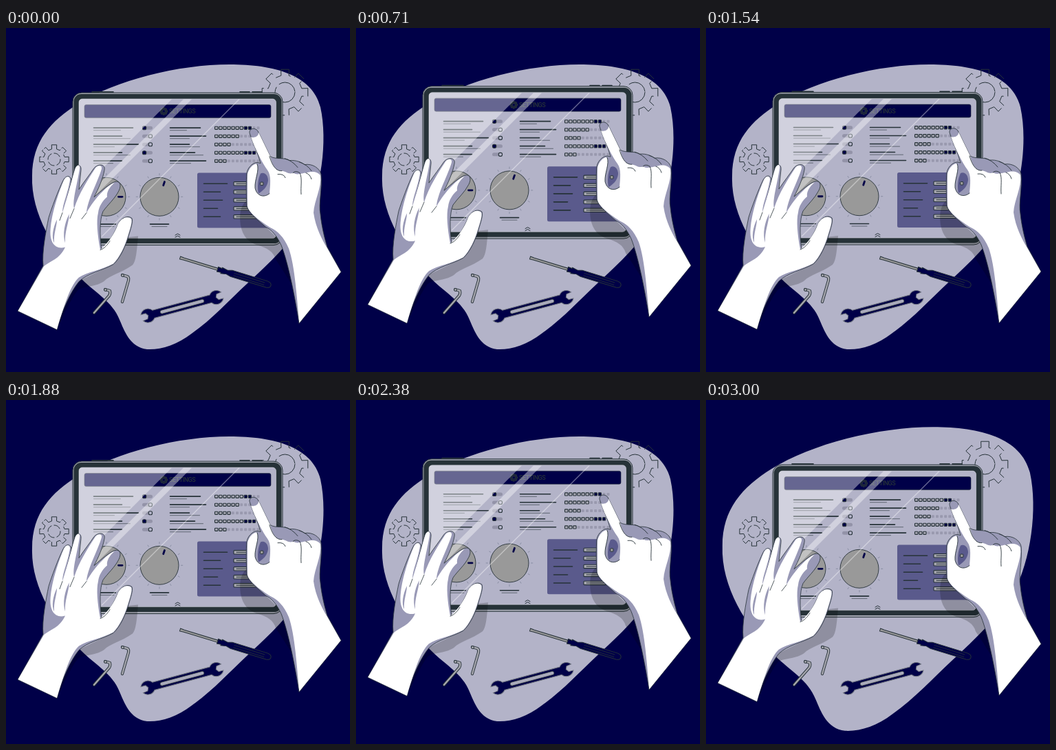
An HTML page for the animation above (3040 ms loop, 500x500 px).

```html
<!DOCTYPE html>
<html lang="en">
<head>
<meta charset="utf-8">
<title>Tablet settings</title>
<style>
html, body { margin: 0; width: 100%; height: 100%; overflow: hidden; background: #000048; }
svg { display: block; width: 100vw; height: 100vh; }
.line { fill: none; stroke: #263238; stroke-linecap: round; stroke-linejoin: round; }
.skin { fill: #fff; }
.shade { fill: #9999b6; stroke: #263238; stroke-width: .8; stroke-linejoin: round; }
.cast { fill: #000; opacity: .2; }
.title { font: 500 9px Roboto, "Open Sans", sans-serif; letter-spacing: -.5px; fill: #263238; }
</style>
</head>
<body>
<svg viewBox="0 0 500 500">
  <rect width="500" height="500" fill="#000048"/>
  <path id="blob" fill="#b3b3c8" d="M38 215C38 165 65 135 105 110C160 76 250 53 325 53C390 53 445 68 457 115C468 165 458 235 435 278C415 310 385 340 350 372C325 395 300 423 270 444C248 461 225 468 205 467C180 464 172 440 165 424C155 398 130 385 110 365C70 325 36 270 38 215Z"/>
  <g id="gears"></g>

  <g id="tools">
    <g id="keys"></g>
    <g transform="translate(253 334) rotate(17)">
      <path d="M0 -2L6 -1.6H58V1.6H6L0 2Z" fill="#999" stroke="#263238"/>
      <path d="M57 -3.5L63 -3V-4.5L71 -3L78 -4.7H132Q138 -4 138 0Q138 4 132 4.7H78L71 3L63 4.5V3L57 3.5Z" fill="#000048" stroke="#263238"/>
      <path class="line" stroke-width=".8" d="M82 -1.5H128M82 2H128"/>
    </g>
    <g transform="translate(256 404.8) rotate(-15)">
      <path d="M-43 -5.8H43A10.5 10.5 0 0 1 60 -5.5L53 -4.5L51 0L54 4L61 4A10.5 10.5 0 0 1 43 5.8H-43A10.5 10.5 0 0 1 -60 5.5L-53 4.5L-51 0L-54 -4L-61 -4A10.5 10.5 0 0 1 -43 -5.8Z" fill="#000048" stroke="#6f747f"/>
      <rect x="-33" y="-2.6" width="66" height="5.2" rx="2.6" fill="#aaaabb" stroke="#263238" stroke-width=".7"/>
    </g>
  </g>

  <g id="floating">
    <path class="line" stroke-width="1.6" d="M125 92.3H156M340 92.3H354M358 92.3H372"/>
    <rect x="97" y="93.5" width="305" height="221.5" rx="13" fill="#a4a7b2" stroke="#263238"/>
    <rect x="98.5" y="95.5" width="302" height="217" rx="11" fill="#263238"/>
    <rect x="106" y="102.5" width="286.5" height="202.5" rx="5" fill="#b3b3c8" stroke="#d0d2da" stroke-width=".6"/>
    <rect x="114" y="111" width="271" height="19" rx="2.5" fill="#000048" stroke="#263238" stroke-width=".6"/>
    <g id="icon"></g>
    <text class="title" x="237" y="123.8">SETTINGS</text>
    <rect x="278" y="210" width="107" height="80" rx="2.5" fill="#5a5a8c"/>
    <g id="controls"></g>
    <path class="line" d="M246 300.5L249.5 298.5L253 300.5M246 303.5L249.5 301.5L253 303.5"/>
    <g fill="#fff" opacity=".4">
      <path d="M110 103H241L106 238V107Q106 103 110 103Z"/>
      <path d="M258 103H270L106 267V255Z"/>
      <path d="M338 103H340L140 303H138Z"/>
    </g>

    <path class="cast" d="M174 304L192 302C190 325 189 338 184 344C167 356 152 358 142 368C128 377 112 374 104 381C94 394 86 412 74 438L96 372L156 343Z"/>
    <path class="cast" d="M350 250C340 258 339 272 341 286C344 303 353 311 365 315C380 319 389 325 392 336C400 348 408 360 416 374L404 315L378 289Z"/>

    <path class="shade" d="M17 411L54 345C52 325 58 295 62 275C66 262 76 235 83 221C87 213 94 213 95 221C95 235 92 240 88 250C92 235 96 215 100 204C103 196 110 198 109 206L106 234C114 222 122 212 128 203C134 196 145 197 143 206C141 218 134 234 128 245C140 235 150 226 158 223C166 221 168 228 164 236C158 248 148 256 141 266C136 278 136 300 139 322C150 310 158 298 163 284C168 275 177 271 183 276C185 281 181 292 178 302C174 316 166 334 156 343C140 352 118 356 106 368C94 383 82 408 74 438Z"/>
    <path class="skin" d="M17.5 410.5L55 346C64 338 78 336 86 318C72 322 62 312 65 288C68 262 78 235 84 221C87 214 93 214 93 220C90 240 82 255 82 268C88 250 97 215 101 203C104 197 108 198 107 204C104 225 96 250 99 262C106 240 120 218 130 203C134 198 140 199 139 204C134 222 118 250 117 268C130 245 148 228 158 224C150 231 146 238 147 245C140 251 135 259 134 268C131 280 133 300 137 322C150 310 158 298 163 284C168 275 177 272 182 277C184 281 180 292 177 302C173 316 165 333 156 342C140 351 118 354 106 362C94 373 86 398 74 437.5Z"/>
    <path fill="#9999b6" d="M74 278C68 290 66 304 70 312C69 298 74 288 74 278ZM92 270C85 282 82 300 86 312C85 296 91 284 92 270Z"/>
    <path class="line" stroke-width=".8" d="M82 268L78 279M99 262L93 276M117 268L110 277M137 322C143 320 148 314 151 309"/>

    <path class="shade" d="M354 152C353 146 361 143 366 149L384 186C392 191 405 187 412 192C422 191 430 195 434 198C445 196 456 203 458 212C460 232 454 255 457 270C459 290 464 308 467 318L487 354L426 429C420 390 410 340 400 315C393 300 385 292 378 289C368 280 352 268 350 258C349 240 349 222 350 210C352 200 361 194 366 195L370 196C366 180 358 165 354 152Z"/>
    <path class="skin" d="M356 158C362 160 368 156 367 151L384 186C387 200 393 208 401 207C407 208 412 213 417 210C424 214 431 210 436 210C444 207 454 208 457 214C459 232 448 250 447 268C450 290 460 308 466 318L486.5 354L426.3 428C423 395 420 345 411 320C404 303 394 294 385 290C372 282 352 268 351 258L351 212C353 203 360 196 365 197C369 206 361 220 362 232C365 245 376 246 383 240C384 228 386 214 380 206C372 195 362 175 356 158Z"/>
    <path fill="#5a5a8c" d="M370 211C375 208 381 213 381 221C380 230 374 236 367 240C365 231 366 219 370 211Z"/>
    <rect x="369.5" y="223.5" width="4.5" height="4.5" rx="1" fill="#999" stroke="#263238"/>
    <path class="line" stroke-width=".9" d="M383 186C387 200 393 208 401 207M395 212Q404 211 406 217M417 210Q421 206 427 210C431 218 428 230 429 241M436 210Q442 212 444 219M405 189Q416 192 424 202M426 194Q438 198 444 207M365 197C369 206 361 220 362 232C365 245 376 246 383 240"/>
  </g>
</svg>
<script>
const LOOP = 3040, STEP = 1000 / 24, REST = .6, INK = '#263238', NAVY = '#000048';
const byId = id => document.getElementById(id);

function add(parent, tag, attrs) {
  const node = document.createElementNS('http://www.w3.org/2000/svg', tag);
  for (const key in attrs) node.setAttribute(key, attrs[key]);
  byId(parent).appendChild(node);
}
const line = (parent, d, width, color = INK) =>
  add(parent, 'path', { d, class: 'line', style: `stroke:${color};stroke-width:${width}` });
const bar = (x, y, length, width) => line('controls', `M${x} ${y}h${length}`, width);
const box = (x, y, width, height, rx, fill, stroke = 'none') =>
  add('controls', 'rect', { x, y, width, height, rx, fill, stroke, 'stroke-width': 1.1 });

function polar(cx, cy, r, degrees) {
  const a = degrees * Math.PI / 180;
  return `${(cx + r * Math.cos(a)).toFixed(2)} ${(cy + r * Math.sin(a)).toFixed(2)}`;
}

function gear(parent, cx, cy, outer, inner, hole, dash, holeDash, width) {
  const points = [];
  for (let a = -90; a < 270; a += 45) {
    points.push(polar(cx, cy, inner, a - 13), polar(cx, cy, outer, a - 10),
      polar(cx, cy, outer, a + 10), polar(cx, cy, inner, a + 13));
  }
  const style = dashes => `stroke-width:${width};stroke-dasharray:${dashes}`;
  add(parent, 'path', { d: `M${points.join('L')}Z`, class: 'line', style: style(dash) });
  add(parent, 'circle', { cx, cy, r: hole, class: 'line', style: style(holeDash) });
}

gear('gears', 405.5, 93.5, 33.8, 25, 14.5, '32 7 19 6', '30 9 14 6', 1);
gear('gears', 70, 191, 21.5, 15.5, 9, '26 3 14 3', '10 4', 1);
gear('icon', 229.3, 120.5, 5.2, 3.9, 2.4, 'none', 'none', 1.3);

for (const d of ['M128 414L150 389Q152 386 151 382L144 380', 'M169 398L178 367Q179 362 176 361L169 359']) {
  line('keys', d, 4.2);
  line('keys', d, 2.4, '#a6a6ae');
}
for (const [cx, cy] of [[144.5, 380.5], [169.5, 359.5]]) {
  add('keys', 'circle', { cx, cy, r: 2, fill: '#a6a6ae', stroke: INK });
}

// left line, left sub-line, middle line, middle sub-line, lit squares, navy squares
const rows = [
  [57, 39, 44, 24, 7, 2], [41, 53, 52, 28, 6, 0], [65, 30, 28, 43, 4, 0],
  [41, 53, 36, 48, 7, 3], [41, 28, 52, 30, 3, 0]
];
const options = [34, 24, 27, 20, 24];

rows.forEach(([left, leftSub, middle, middleSub, lit, navy], i) => {
  const y = 144.7 + i * 12;
  bar(127.5, y - .2, left, 1.6);
  bar(127.5, y + 3.4, leftSub, .6);
  bar(238.5, y - .2, middle, 1.6);
  bar(238.5, y + 3.4, middleSub, .6);

  const on = navy > 0;
  box(198, y - 2.5, 15, 5, 2.5, '#9393a8');
  box(on ? 198.5 : 207.3, y - 2.5, 5.2, 5, 2, on ? NAVY : '#b3b3c8', INK);

  for (let n = 0; n < 11; n++) {
    const x = 303.5 + n * 6.1;
    if (n < lit) box(x, y - 2.1, 4.4, 4.2, .8, '#a8a8b4', INK);
    else if (n < lit + navy) box(x, y - 2.1, 4.2, 4.2, .8, NAVY, INK);
    else box(x, y - 2, 4, 4, .8, '#9999ae');
  }

  const py = 225.7 + i * 12;
  bar(287.5, py, options[i], 1.6);
  box(331, py - 2.7, 45, 5.4, 1, '#aaaab2', INK);
  bar(335, py, 30, 1);
});

for (const [cx, angle] of [[146, 0], [223, -71]]) {
  const cy = 244.7;
  for (let a = 0; a < 360; a += 30) {
    line('controls', `M${polar(cx, cy, 31.5, a)}L${polar(cx, cy, 33.8, a)}`, .7, '#777f94');
  }
  add('controls', 'circle', { cx, cy, r: 28, fill: '#999', stroke: INK, 'stroke-width': .9 });
  line('controls', `M${polar(cx, cy, 17.5, angle)}L${polar(cx, cy, 23, angle)}`, 2.8, NAVY);
  bar(cx - 13.5, 284.5, 27, 1.6);
  bar(cx - 11, 288, 22, .6);
}

function frame(now) {
  // The motion advances in steps of 24 per second.
  const time = Math.floor((now % LOOP + 5) / STEP) * STEP;
  const phase = time % 1500 / 750;
  const lift = -10 * (1 - Math.abs(1 - phase));
  const beat = time - 2500;
  const swell = beat <= 0 ? 0 : beat < 300 ? beat / 300 : 1 - (beat - 300) / 600;
  byId('floating').setAttribute('transform', `translate(0 ${REST + lift})`);
  byId('blob').setAttribute('transform',
    `translate(250 260) scale(${1 + .1 * swell}) translate(-250 -260)`);
}

const start = performance.now();
function tick() {
  frame(performance.now() - start);
  requestAnimationFrame(tick);
}
tick();
</script>
</body>
</html>
```
